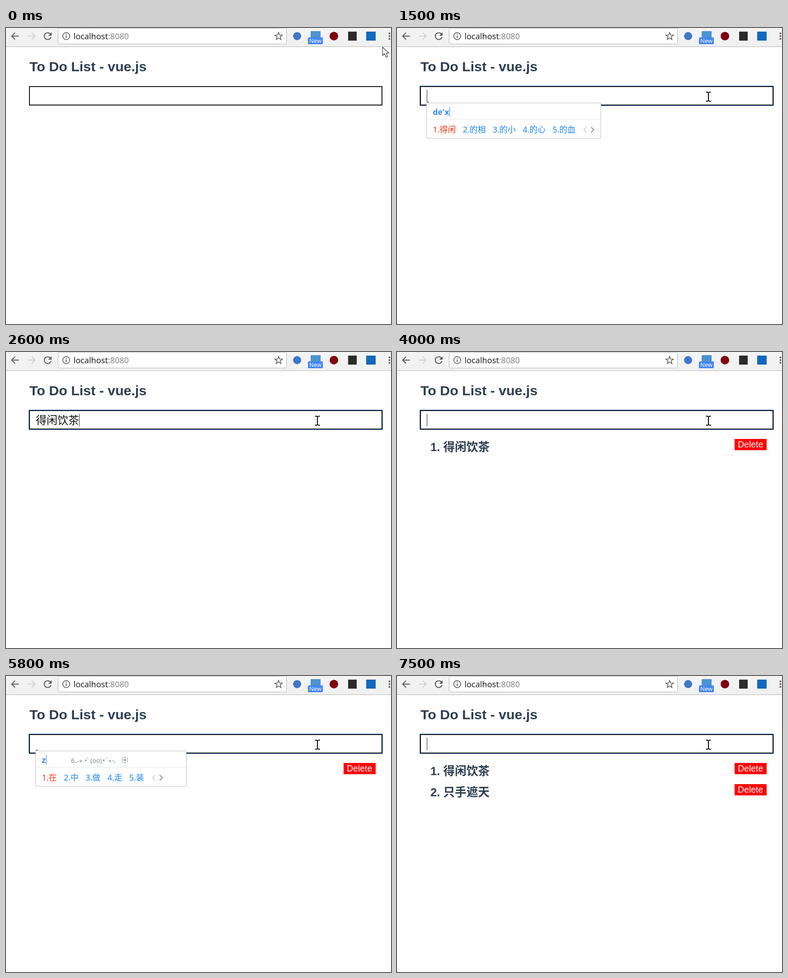
These frames come from a looping animation (853x657 px, 8000 ms). An HTML page:

```html
<!DOCTYPE html>
<html lang="zh">
<head>
<meta charset="utf-8">
<title>To Do List</title>
<style>
  html, body { margin: 0; width: 100%; height: 100%; overflow: hidden; background: #fefefe; }
  svg { display: block; }
  text { white-space: pre; }
  .ui { font-family: "Noto Sans", "Noto Sans CJK SC", "Noto Sans CJK", sans-serif; }
  .page { font-family: "Liberation Sans", "Noto Sans CJK SC", "Noto Sans CJK", sans-serif; }
  .bold { font-weight: bold; fill: #2c3e50; }
  .line { fill: none; stroke: #5a5a5a; stroke-width: 2; }
</style>
</head>
<body>
<svg width="853" height="657" viewBox="0 0 853 657">
  <defs>
    <linearGradient id="bar" x2="0" y2="1">
      <stop offset="0" stop-color="#f5f4f5"/><stop offset="1" stop-color="#f0f0f0"/>
    </linearGradient>
  </defs>

  <!-- browser bar -->
  <rect width="853" height="41" fill="url(#bar)"/>
  <rect y="41" width="853" height="1" fill="#b4b4b4"/>
  <path class="line" d="M28.5 18H13M20 10.5L12.5 18L20 25.5"/>
  <path class="line" style="stroke:#d0d0d0" d="M48.500 18H64M57 10.500L64.500 18L57 25.500"/>
  <path class="line" d="M98.500 13.500A7.600 7.600 0 1 0 99.700 20"/>
  <path fill="#5a5a5a" d="M101 9.500V17H93.500z"/>
  <rect x="115.500" y=".5" width="506" height="35" rx="3" fill="#fff" stroke="#b3b3b3"/>
  <circle class="line" cx="133.500" cy="18" r="7.800" style="stroke-width:1.700"/>
  <path fill="#5a5a5a" d="M132.500 13h2v2h-2zM132.500 16.700h2v5.600h-2z"/>
  <text class="ui" x="149.500" y="24.500" font-size="18.100" fill="#222">localhost<tspan fill="#858585">:8080</tspan></text>
  <path id="star" class="line" style="stroke-width:1.600"/>
  <circle cx="645" cy="18" r="9" fill="#3f78c8"/>
  <rect x="675" y="7" width="22" height="16" fill="#4b93cf"/>
  <rect x="669" y="21" width="33" height="15" rx="1" fill="#4285f4"/>
  <text class="ui" x="685.500" y="33" font-size="13" fill="#fff" text-anchor="middle">New</text>
  <circle cx="726.500" cy="18" r="9.500" fill="#800412"/>
  <rect x="758" y="8" width="19" height="20" fill="#2b2b2b"/>
  <rect x="798" y="8" width="21" height="20" fill="#1269bd"/>
  <g fill="#5a5a5a"><circle cx="849.500" cy="12" r="2"/><circle cx="849.500" cy="18" r="2"/><circle cx="849.500" cy="24" r="2"/></g>

  <!-- page -->
  <text class="page bold" x="52" y="95.500" font-size="30.400">To Do List - vue.js</text>
  <rect x="52" y="130" width="781" height="41" fill="#fff" stroke="#111" stroke-width="2"/>
  <rect id="focus" x="50.500" y="128.500" width="784" height="44" rx="1" fill="none" stroke="#5795e6"/>
  <g id="scene"></g>
  <path id="arrow" fill="#fff" stroke="#222" stroke-width="1.100" d="M.5 .5V19L4.800 15L8.300 23L11.800 21.500L8.300 14H14.300z"/>
  <path id="beam" fill="none" stroke="#000" stroke-width="2" d="M-5.500 -9.500H-2L0 -8L2 -9.500H5.500M-5.500 10.500H-2L0 9L2 10.500H5.500M0 -8.500V9.500"/>
</svg>
<script>
const LOOP = 8000;
const $ = id => document.getElementById(id);

// Each step changes part of the state. ime: [typed, candidates, hint, least right edge]
const steps = [
  [0, { mouse: [834, 42], focus: 0, caret: 0, ime: null, value: '', items: [] }],
  [100, { mouse: [806, 10] }],
  [200, { mouse: [762, 52] }],
  [300, { mouse: [702, 98] }],
  [400, { mouse: [691, 140] }],
  [500, { mouse: [690, 152], focus: 1, caret: 1 }],
  [1000, { caret: 0 }],
  [1100, { caret: 1, ime: ['d', '的 都 到 等 大'] }],
  [1300, { ime: ['de', '的 得 德 地 嘚'] }],
  [1500, { ime: ["de'x", '得闲 的相 的小 的心 的血'] }],
  [1600, { ime: ["de'xi", '的戏 得洗 的系 的细 的喜', '', 463] }],
  [1700, { ime: ["de'xia", '的下 得瑕^ 的夏 的虾 的霞', '', 474] }],
  [1800, { ime: ["de'xian", '得闲 的线 的相(xiang) 的县 的先', 'key'] }],
  [2000, { ime: ["de'xian'y", '的闲鱼 得先有^ 的相(xiang)遇 的嫌疑 的响应'] }],
  [2300, { ime: ["de'xian'y'c", '得闲饮茶 的相(xiang)遇 得闲 的线 的县'] }],
  [2600, { ime: null, value: '得闲饮茶' }],
  [3000, { value: '', items: ['得闲饮茶'] }],
  [3500, { caret: 0 }], [4000, { caret: 1 }],
  [4500, { caret: 0 }], [5000, { caret: 1 }],
  [5300, { ime: ['z', '在 中 做 走 装'] }],
  [5400, { ime: ['z', '在 中 做 走 装', 'face', 399] }],
  [5800, { caret: 0 }],
  [6000, { caret: 1, ime: ["z's", '只是 这是 真是 正是 再'] }],
  [6300, { ime: ["z's'z", '只是在 这是在 真实者 在手中 找散装'] }],
  [6600, { ime: ["z's'z't", '只手遮天 这首遮天 直视着他 只是在 这是在'] }],
  [7000, { ime: null, value: '只手遮天' }],
  [7500, { value: '', items: ['得闲饮茶', '只手遮天'] }]
];
let last = {};
const states = steps.map(([at, change]) => ({ at, ...(last = { ...last, ...change }) }));

const text = (x, y, size, fill, s, extra = 'class="ui"') =>
  `<text x="${x}" y="${y}" font-size="${size}" fill="${fill}" ${extra}>${s}</text>`;
const rect = (x, y, w, h, fill) => `<rect x="${x}" y="${y}" width="${w}" height="${h}" fill="${fill}"/>`;
const path = (d, stroke, width = 1) => `<path d="${d}" fill="none" stroke="${stroke}" stroke-width="${width}"/>`;

const grey = '#7d8594';
const hints = {
  key: `<rect x="188.500" y="180.500" width="25" height="13" rx="4" fill="none" stroke="${grey}"/>` +
    text(198, 191, 12, grey, ';') + text(227, 192, 13.7, grey, '按分号进行人名输入'),
  face: text(144, 193, 14, grey, '6.') + path('M157 193Q157 189 161 189M235 187Q240 188 240 194', grey) +
    text(162, 196, 12, grey, '*') + text(174, 193, 14, grey, '•') + text(179, 193, 14, grey, '`') +
    text(187, 193, 14, grey, '(oo)') + text(214, 193, 14, grey, '•') + text(221, 193, 14, grey, '´') +
    text(227, 196, 12, grey, '*') +
    `<circle cx="263.500" cy="186.500" r="6.300" fill="none" stroke="${grey}"/>` +
    path('M260 186.500H267M263.500 183V190', grey, 1.4)
};

const glyphWidth = c => c < '\x7f' ? 8.55 : 17.9;

function imeBox([typed, list, hint, least = 0]) {
  let x = 79.5, out = '';
  list.split(' ').forEach((word, i) => {
    const cloud = word.endsWith('^');
    const label = cloud ? word.slice(0, -1) : word;
    const color = i ? '#1a86ee' : '#f5330f';
    out += text(x, 232, 17.9, color, `${i + 1}.${label}`);
    x += 14.5 + [...label].reduce((sum, c) => sum + glyphWidth(c), 0);
    if (cloud) {
      out += path(`M${x + 4} 221.500q-3 -1 -1 -4q2 -4 6 -2q4 0 3 3q0 3 -3 3z`, color);
      x += 17;
    }
    x += 16;
  });
  const end = x - 16, edge = Math.round(Math.max(end + 55.5, least));
  const chevron = (cx, dir, color) => path(`M${cx - 3 * dir} 220L${cx + 3 * dir} 226L${cx - 3 * dir} 232`, color, 1.5);
  return `<rect x="65.500" y="166.500" width="${edge - 65}" height="78" fill="#fff" stroke="#b9bfd0"/>` +
    rect(66, 202, edge - 66, 1, '#e3e5ea') + out +
    chevron(end + 22, -1, '#c4c4c4') + chevron(end + 38, 1, '#6c6c6c') +
    (hints[hint] || '') +
    text(79.5, 193, 17.5, '#3a86fb', typed, 'class="ui" id="typed" font-weight="bold"') +
    `<rect id="pen" y="175" width="1.200" height="22" fill="#3a86fb"/>`;
}

function render(s) {
  const page = 'class="page"';
  let out = '';
  s.items.forEach((item, i) => {
    const y = 47 * i;
    out += text(74, y + 220, 25.7, '#2c3e50', `${i + 1}. ${item}`, 'class="page bold"') +
      rect(748, y + 193, 71, 25, '#f00') + text(755, y + 212, 19.5, '#fff', 'Delete', page);
  });
  out += text(66, 160, 24, '#111', s.value, page);
  if (s.caret) out += rect(66 + 24 * s.value.length, 137, 1, 28, '#222');
  if (s.ime) out += rect(66, 164, 5, 1, '#222') + imeBox(s.ime);
  $('scene').innerHTML = out;
  if (s.ime) $('pen').setAttribute('x', 80 + $('typed').getComputedTextLength());

  $('focus').style.display = s.focus ? '' : 'none';
  const [mx, my] = s.mouse, inField = my > 129;
  $('arrow').style.display = inField ? 'none' : '';
  $('beam').style.display = inField ? '' : 'none';
  for (const id of ['arrow', 'beam']) $(id).setAttribute('transform', `translate(${mx} ${my})`);
}

const star = Array.from({ length: 10 }, (_, i) => {
  const a = i * Math.PI / 5, r = i % 2 ? 3.7 : 8.8;
  return `${(604 + r * Math.sin(a)).toFixed(1)} ${(18.5 - r * Math.cos(a)).toFixed(1)}`;
});
$('star').setAttribute('d', `M${star.join('L')}z`);

const start = performance.now();
let shown;
function tick(now) {
  const t = Math.max(0, now - start) % LOOP;
  const state = states.findLast(s => s.at <= t);
  if (state !== shown) render(shown = state);
  requestAnimationFrame(tick);
}
tick(start);
</script>
</body>
</html>
```
